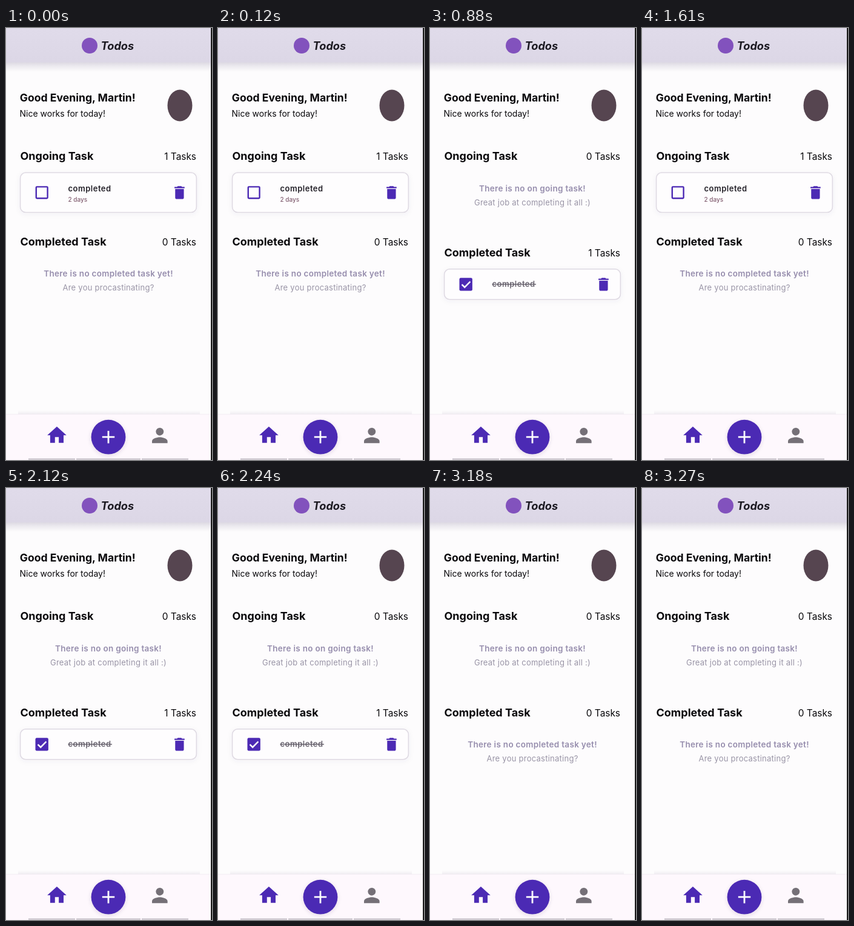
These frames come from a looping animation (340 by 711 pixels, 4.64 s). An HTML page:

```html
<!DOCTYPE html>
<html lang="en">
<head>
<meta charset="utf-8">
<title>Todos</title>
<style>
  html, body { margin: 0; width: 100%; height: 100%; overflow: hidden; background: #fdfcfd; }
  svg { display: block; width: 100%; height: 100%; }
  text { font-family: Inter, "Open Sans", sans-serif; fill: #09080b; }
  .greet { font-size: 17.6px; font-weight: 700; }
  .head { font-size: 18px; font-weight: 700; }
  .body { font-size: 14px; }
  .count { font-size: 15.4px; text-anchor: end; }
  .brand { font-size: 18.2px; font-weight: 700; font-style: italic; fill: #1c1a22; }
  .name { font-size: 13px; font-weight: 600; letter-spacing: .5px; fill: #242129; }
  .due { font-size: 10px; font-weight: 500; fill: #815d70; }
  .struck { fill: #706b76; }
  .strong { font-size: 13.5px; font-weight: 600; letter-spacing: .3px; text-anchor: middle; fill: #968dad; }
  .soft { font-size: 13px; letter-spacing: .25px; text-anchor: middle; fill: #9994a6; }
  .card { fill: #fefdfe; stroke: #dfdae3; stroke-width: 1.6; }
  .ink { fill: #4c2ab4; }
</style>
</head>
<body>
<svg viewBox="0 0 340 711" xmlns="http://www.w3.org/2000/svg">
  <defs>
    <linearGradient id="bar" x2="0" y2="1">
      <stop offset="0" stop-color="#e0dbea"/>
      <stop offset="1" stop-color="#dcd7e6"/>
    </linearGradient>
    <linearGradient id="drop" x2="0" y2="1">
      <stop offset="0" stop-color="#dcd8e2"/>
      <stop offset=".4" stop-color="#ebe9ee"/>
      <stop offset="1" stop-color="#fdfcfd"/>
    </linearGradient>
    <linearGradient id="lift" x2="0" y2="1">
      <stop offset="0" stop-color="#f2eff3" stop-opacity="0"/>
      <stop offset="1" stop-color="#eeebf0"/>
    </linearGradient>
    <filter id="glow" x="-20%" y="-40%" width="140%" height="190%">
      <feDropShadow dx="0" dy="2" stdDeviation="4" flood-color="#58456f" flood-opacity=".05"/>
    </filter>
    <filter id="lifted" x="-30%" y="-30%" width="160%" height="160%">
      <feDropShadow dx="0" dy="2" stdDeviation="3" flood-color="#40364f" flood-opacity=".14"/>
    </filter>
    <path id="bin" d="M-6 7c0 1.1.9 2 2 2h8c1.1 0 2-.9 2-2V-5H-6zM7-8H3.5l-1-1h-5l-1 1H-7v2H7z" transform="scale(1.19)"/>
  </defs>

  <rect width="340" height="711" fill="#fdfcfd"/>
  <rect y="56" width="338" height="16" fill="url(#drop)"/>
  <rect width="338" height="56.5" fill="url(#bar)"/>
  <circle cx="138" cy="29" r="13" fill="#8252bd"/>
  <text class="brand" x="156.5" y="36.2">Todos</text>

  <text class="greet" x="22.8" y="121.2">Good Evening, Martin!</text>
  <text class="body" x="22.5" y="146.4">Nice works for today!</text>
  <ellipse cx="287" cy="127.5" rx="20.5" ry="26" fill="#564550"/>

  <text class="head" x="23.5" y="217.3">Ongoing Task</text>
  <text class="count" x="314" y="216.5" id="openCount"></text>
  <g id="openCard">
    <rect class="card" x="23.6" y="238" width="290.8" height="65.5" rx="9" filter="url(#glow)"/>
    <rect x="49.8" y="261.4" width="18.8" height="18.8" rx="1.2" fill="none" stroke="#4c2ab4" stroke-width="2.4"/>
    <text class="name" x="102.5" y="269">completed</text>
    <text class="due" x="102.5" y="286">2 days</text>
    <use href="#bin" class="ink" transform="translate(286.4 270.9)"/>
  </g>
  <g id="openEmpty">
    <text class="strong" x="169" y="268.5">There is no on going task!</text>
    <text class="soft" x="169" y="291.5">Great job at completing it all :)</text>
  </g>

  <g id="doneArea">
    <text class="head" x="23.5" y="358.3">Completed Task</text>
    <text class="count" x="314" y="357.5" id="doneCount"></text>
    <g id="doneEmpty">
      <text class="strong" x="169" y="409">There is no completed task yet!</text>
      <text class="soft" x="169" y="432">Are you procastinating?</text>
    </g>
    <g id="doneCard">
      <rect class="card" x="23.6" y="378.8" width="290.8" height="50" rx="9" filter="url(#glow)"/>
      <rect class="ink" x="48.5" y="393.2" width="21.4" height="21.4" rx="2.4"/>
      <path d="M52.6 404.1l4.6 4.6 9.2-9.4" fill="none" stroke="#fff" stroke-width="2.4"/>
      <text class="name struck" x="102.5" y="408">completed</text>
      <path d="M102.5 403.8H175" stroke="#56515c" stroke-width="1.2"/>
      <use href="#bin" class="ink" transform="translate(286.4 403.9)"/>
    </g>
  </g>

  <rect x="20" y="629" width="300" height="7" fill="url(#lift)"/>
  <rect y="636" width="338" height="75" fill="#fef8fd"/>
  <path d="M0 635.8H338" stroke="#f2edf3"/>
  <path class="ink" d="M10 20v-6h4v6h5v-8h3L12 3 2 12h3v8z" transform="translate(65 651.2) scale(1.58)"/>
  <circle class="ink" cx="169" cy="673.2" r="28.4" filter="url(#lifted)"/>
  <path d="M158.8 673.2h20.4m-10.2-10.2v20.4" stroke="#fff" stroke-width="2.8"/>
  <g fill="#757077">
    <circle cx="253.8" cy="664.3" r="6.4"/>
    <path d="M12 14c-2.67 0-8 1.34-8 4v2h16v-2c0-2.66-5.33-4-8-4z" transform="translate(234.6 651.2) scale(1.6)"/>
  </g>
  <path d="M37 709.6h77m2 0h106m2 0h77" stroke="#c3bec5" stroke-width="2"/>
  <rect x="338.2" width="1.8" height="711" fill="#050505"/>
</svg>
<script>
  const LOOP = 4640;
  const el = id => document.getElementById(id);
  const show = (id, on) => el(id).setAttribute("visibility", on ? "visible" : "hidden");
  const count = (id, on) => el(id).textContent = (on ? 1 : 0) + " Tasks";

  // The task is ticked, unticked, ticked again and finally deleted.
  function draw(t) {
    const open = t < 610 || (t >= 1610 && t < 2030);
    const done = !open && t < 3180;
    count("openCount", open);
    count("doneCount", done);
    show("openCard", open);
    show("openEmpty", !open);
    show("doneCard", done);
    show("doneEmpty", !done);
    el("doneArea").setAttribute("transform", `translate(0 ${open ? 0 : 18})`);
  }

  const start = performance.now();
  function tick() {
    draw((performance.now() - start) % LOOP);
    requestAnimationFrame(tick);
  }
  tick();
</script>
</body>
</html>
```
